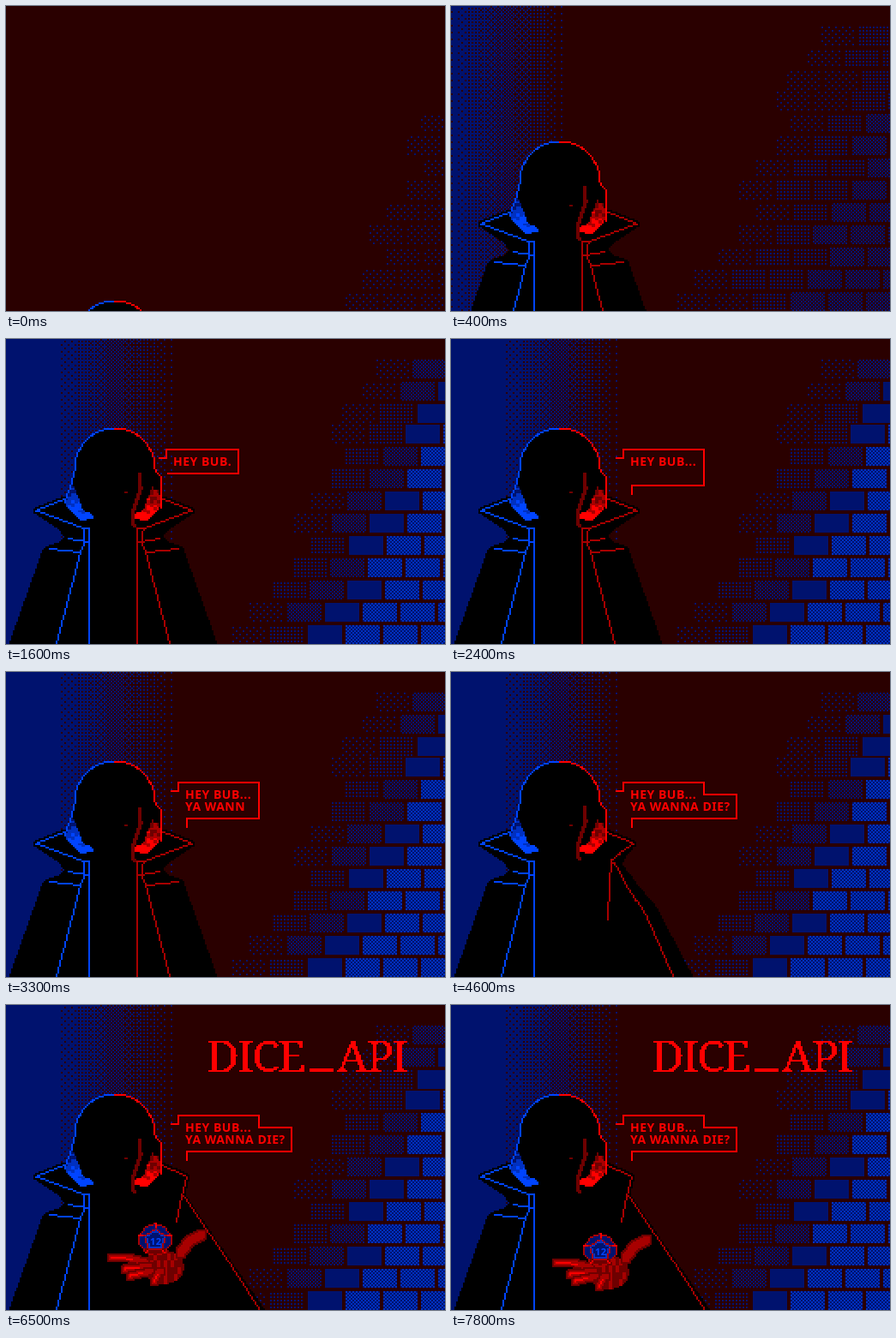
Write an HTML page with a canvas that moves like this. It is 512 px wide and 356 px high and loops after 8 s.

```html
<!DOCTYPE html>
<html lang="en">
<head>
<meta charset="utf-8">
<title>DICE_API</title>
<style>
html, body { margin: 0; overflow: hidden; background: #2a0000; }
canvas { display: block; }
</style>
</head>
<body>
<canvas id="stage" width="512" height="356" role="img" aria-label="DICE_API. Hey bub... ya wanna die?"></canvas>
<script>
const W = 256, H = 178, LOOP = 8000, STEP = 100;
const ctx = document.getElementById('stage').getContext('2d');
const art = document.createElement('canvas').getContext('2d');
art.canvas.width = W;
art.canvas.height = H;
ctx.imageSmoothingEnabled = false;
const image = art.createImageData(W, H);
const buf = new Uint32Array(image.data.buffer);

const rgb = n => (0xff000000 | (n & 255) << 16 | n & 0xff00 | n >> 16) >>> 0;
const BLACK = rgb(0), WALL = rgb(0x2a0000), NAVY = rgb(0x00126e), BLUE = rgb(0x0044ff),
  MIDBLUE = rgb(0x0030c0), RED = rgb(0xff0000), CRIMSON = rgb(0xa80000), MAROON = rgb(0x6e0000);

const phase = (t, start, span) => Math.max(0, Math.min(1, (t - start) / span));
const easeOut = p => 1 - (1 - p) ** 3;
const backOut = (p, c) => 1 + (c + 1) * (p - 1) ** 3 + c * (p - 1) ** 2;
const noise = (x, y) => { const v = Math.sin(x * 12.99 + y * 78.23) * 43758.5; return v - Math.floor(v); };

// Points are written in stage pixels and stored in art pixels (half size).
const pts = s => s.split(' ').map(p => p.split(',').map(v => v / 2));
const mix = (a, b, k) => a.map((p, i) => p.map((v, j) => v + (b[i][j] - v) * k));
const mirror = points => points.map(([x, y]) => [125 - x, y]);
const arc = (cx, cy, rx, ry, turn, n) => Array.from({ length: n + 1 }, (_, i) => {
  const a = turn * Math.PI * 2 * i / n;
  return [cx + rx * Math.sin(a), cy - ry * Math.cos(a)];
});

function dot(x, y, c) {
  if (x >= 0 && y >= 0 && x < W && y < H) buf[y * W + x] = c;
}

function rect(x, y, w, h, c) {
  for (let j = y; j < y + h; j++) for (let i = x; i < x + w; i++) dot(i, j, c);
}

function line(points, c, dy = 0, size = 1) {
  const r = size >> 1;
  for (let i = 1; i < points.length; i++) {
    const [ax, ay] = points[i - 1], [bx, by] = points[i];
    const n = Math.ceil(Math.max(1, Math.abs(bx - ax), Math.abs(by - ay)));
    for (let s = 0; s <= n; s++)
      rect(Math.floor(ax + (bx - ax) * s / n) - r, Math.floor(ay + (by - ay) * s / n) + dy - r, size, size, c);
  }
}

// The paint is a colour, or a function of the place that gives one.
function fill(points, paint, dy = 0) {
  const ys = points.map(p => p[1]);
  for (let y = Math.floor(Math.min(...ys)); y <= Math.max(...ys); y++) {
    const cuts = [];
    points.forEach(([ax, ay], i) => {
      const [bx, by] = points[(i + 1) % points.length], m = y + .5;
      if ((ay <= m) !== (by <= m)) cuts.push(ax + (m - ay) / (by - ay) * (bx - ax));
    });
    cuts.sort((a, b) => a - b);
    for (let i = 0; i + 1 < cuts.length; i += 2)
      for (let x = Math.round(cuts[i]); x < Math.round(cuts[i + 1]); x++)
        dot(x, y + dy, typeof paint === 'function' ? paint(x, y) : paint);
  }
}

// Ordered dither: a 4 x 4 Bayer rank from interleaved bits
const dither = (x, y, d) =>
  (((x ^ y) & 1) << 3 | (y & 1) << 2 | (x ^ y) & 2 | (y & 2) >> 1) < d * 15;

function backdrop(t) {
  const edge = 97 - Math.round(105 * (1 - easeOut(phase(t, 0, 1190))));
  for (let y = 0; y < H; y++)
    for (let x = 0; x < W; x++)
      buf[y * W + x] = dither(x, y, (edge - x) / 68) ? NAVY : WALL;
}

// Running bond that thins out along a slanted edge; shade 1 to 3 dithered, 4 solid, 5 lit
function bricks(t) {
  for (let row = 0; row < 13; row++) {
    const top = Math.floor(167 - 12.9 * row), edge = 132 + 6.5 * row;
    const last = Math.floor(row % 2 ? 257 - (row - 6) ** 2 / 5 : 244 - (row - 4) ** 2 / 10);
    for (let left = last; left > edge - 2; left -= 22) {
      const full = Math.min(5, Math.round(1 + (left - edge) / 16));
      const shade = Math.min(full, Math.floor(1 + t / 200 - (5 - full) * .4));
      if (shade < 1) continue;
      const density = shade > 3 ? 2 : 2 ** shade / 16;
      for (let y = top; y < top + 11; y++)
        for (let x = left; x < left + 20; x++)
          if (dither(x, y, density)) dot(x, y, shade === 5 && (x + y) % 2 ? MIDBLUE : NAVY);
    }
  }
}

const dome = arc(63.5, 76, 23.5, 24, .25, 12);
const headRight = dome.concat(pts('180,160 181,196 176,204 164,211 148,212'));
const headLeft = dome.map(([x, y]) => [127 - x, y]).concat(pts('77,166 68,190 72,198 86,212 102,209'));

const coat = pts('70,186 34,200 66,222 72,230 62,240 46,246 6,358');
const lapel = pts('70,186 34,200 90,221 97,221 97,358');
const seam = pts('90,222 91,238 87,248 58,358');
const folds = ['50,245 86,249', '72,233 96,237'].map(pts);
const middle = pts('126,358 126,180');
const openCoat = pts('180,186 211,200 207,214 206,222 228,254 250,286 300,358');
const openLapel = pts('180,186 211,200 207,214 205,222 199,252');
const openSeam = pts('206,222 229,255 262,302 298,358');
const beard = pts('77,166 68,190 72,198 86,212 103,210 100,204 90,200 84,184');
const strand = pts('156,158 158,174 148,204 150,218');

function figure(t) {
  const dy = Math.round(120 * (1 - easeOut(phase(t, 0, 1030))));
  const open = t < 4600 ? 0 : backOut(phase(t, 4500, 900), 4);
  const right = (a, b) => mix(mirror(a), b, open);

  for (const side of [coat, right(coat, openCoat)]) {
    fill(side.concat(middle), BLACK, dy);
    line(side, BLACK, dy, 3);
  }
  for (const l of [lapel, seam, ...folds]) line(l, BLUE, dy);
  line(right(lapel, openLapel), CRIMSON, dy);
  line(right(seam, openSeam), CRIMSON, dy);
  if (!open) for (const l of folds) line(mirror(l), CRIMSON, dy);

  fill(headLeft.concat(headRight.slice().reverse()), BLACK, dy);
  // Stubble brightens towards the jaw
  const stubble = (...tones) => (x, y) =>
    tones[Math.max(0, Math.min(3, Math.floor((y - 84) / 6 + noise(x >> 1, y >> 1) * 1.6)))];
  fill(beard, stubble(BLACK, NAVY, MIDBLUE, BLUE), dy);
  fill(mirror(beard), stubble(BLACK, MAROON, CRIMSON, RED), dy);
  const talking = t >= 2800 && t <= 3800 && t / STEP % 2;
  line(strand, MAROON, dy + (talking ? 1 : 0), 2);
  rect(69, 89 + dy, 2, 1, MAROON);
  line(headLeft.slice(0, -3), BLUE, dy);
  line(headRight.slice(0, -3), RED, dy);
}

const SPEECH = 'bold 14px "Noto Sans", sans-serif';
const labels = [];

function width(s) {
  ctx.font = SPEECH;
  ctx.letterSpacing = '0.5px';
  return Math.round(ctx.measureText(s).width / 2);
}

function bubble(t) {
  if (t < 1000) return;
  const first = 'HEY BUB...'.slice(0, (t - 800) / 100);
  const typed = t < 2700 ? 0 : t < 3600 ? Math.min(8, (t - 2600) / 100) : Math.floor(9 + (t - 3600) / 200);
  const second = 'YA WANNA DIE?'.slice(0, typed);
  const x = 93 + Math.round(7 * phase(t, 1600, 200));
  const grow = easeOut(phase(t, 1800, 900));
  const bottom = 78 + Math.round(7 * grow), foot = x + 1 + Math.round(4 * grow);
  const right = x + 8 + width(first), wide = Math.max(right, x + 8 + width(second));

  line([[x - 4, 69], [x, 69], [x, 64], [right, 64], [right, 71], [wide, 71], [wide, bottom],
    [foot, bottom], [foot, bottom + Math.round(5 * grow)]], RED);
  labels.push([first, 2 * x + 9, 148, SPEECH, '#f00'], [second, 2 * x + 9, 162, SPEECH, '#f00']);
}

// Title lettering, reduced to hard pixels once
const titleDots = (() => {
  const w = 130, h = 30, c = document.createElement('canvas').getContext('2d');
  c.canvas.width = w;
  c.canvas.height = h;
  c.font = '500 26px "Noto Serif", serif';
  c.letterSpacing = '-1px';
  c.fillText('DICE', 0, 22);
  c.fillText('API', 76, 22);
  c.fillRect(60, 20, 14, 2);
  const d = c.getImageData(0, 0, w, h).data, dots = [];
  for (let i = 0; i < w * h; i++) if (d[i * 4 + 3] > 95) dots.push([i % w, Math.floor(i / w)]);
  return dots;
})();

function title(t) {
  if (t < 5700) return;
  const top = 17 - Math.round(52 * (1 - easeOut(phase(t, 5600, 1100))));
  for (const [x, y] of titleDots) dot(x + 117, y + top, RED);
}

function die(cy) {
  const x = 87, outer = arc(x, cy, 9.5, 9.5, 1, 10), core = arc(x, cy, 6.5, 6.5, 1, 5);
  fill(outer, (_, y) => y > cy + 4 ? MAROON : NAVY);
  line(outer, CRIMSON);
  core.forEach((p, i) => line([p, outer[i * 2]], RED));
  fill(core, NAVY);
  line(core, CRIMSON);
  line(arc(x, cy, 5.5, 5.5, 1, 5), MIDBLUE);
  labels.push(['12', 2 * x - 6, 2 * cy + 6, 'bold 11px "Noto Sans", sans-serif', '#04f']);
}

const palm = arc(92, 156, 12, 10, 1, 16);
const thumb = pts('228,275 216,281 204,296');
const fingers = ['122,300 142,301 162,306', '138,314 166,311', '144,322 168,317', '172,329 180,316'].map(pts);

function offer(t) {
  if (t < 5800) return;
  const dy = Math.round(45 * (1 - backOut(phase(t, 5700, 1050), 1.7)));
  fill(palm, (x, y) => noise(x >> 1, y >> 2) < .3 ? CRIMSON : MAROON, dy);
  line(thumb, MAROON, dy, 6);
  line(thumb, CRIMSON, dy, 4);
  for (const f of fingers) {
    line(f, MAROON, dy, 5);
    line(f, CRIMSON, dy, 3);
    line(mix(f, [f[0], f[0], f[0]], .4), RED, dy);
  }
  const hover = 140 - 7.5 * Math.cos((t - 6780) / 1500 * Math.PI * 2);
  die(Math.round(hover) + Math.max(0, dy));
}

function frame() {
  const t = Math.floor(performance.now() % LOOP / STEP) * STEP;
  labels.length = 0;
  for (const draw of [backdrop, bricks, figure, bubble, title, offer]) draw(t);
  art.putImageData(image, 0, 0);
  ctx.drawImage(art.canvas, 0, 0, 2 * W, 2 * H);
  ctx.letterSpacing = '0.5px';
  for (const [text, x, y, font, color] of labels) {
    ctx.font = font;
    ctx.fillStyle = color;
    ctx.fillText(text, x, y);
  }
  requestAnimationFrame(frame);
}
frame();
</script>
</body>
</html>
```
